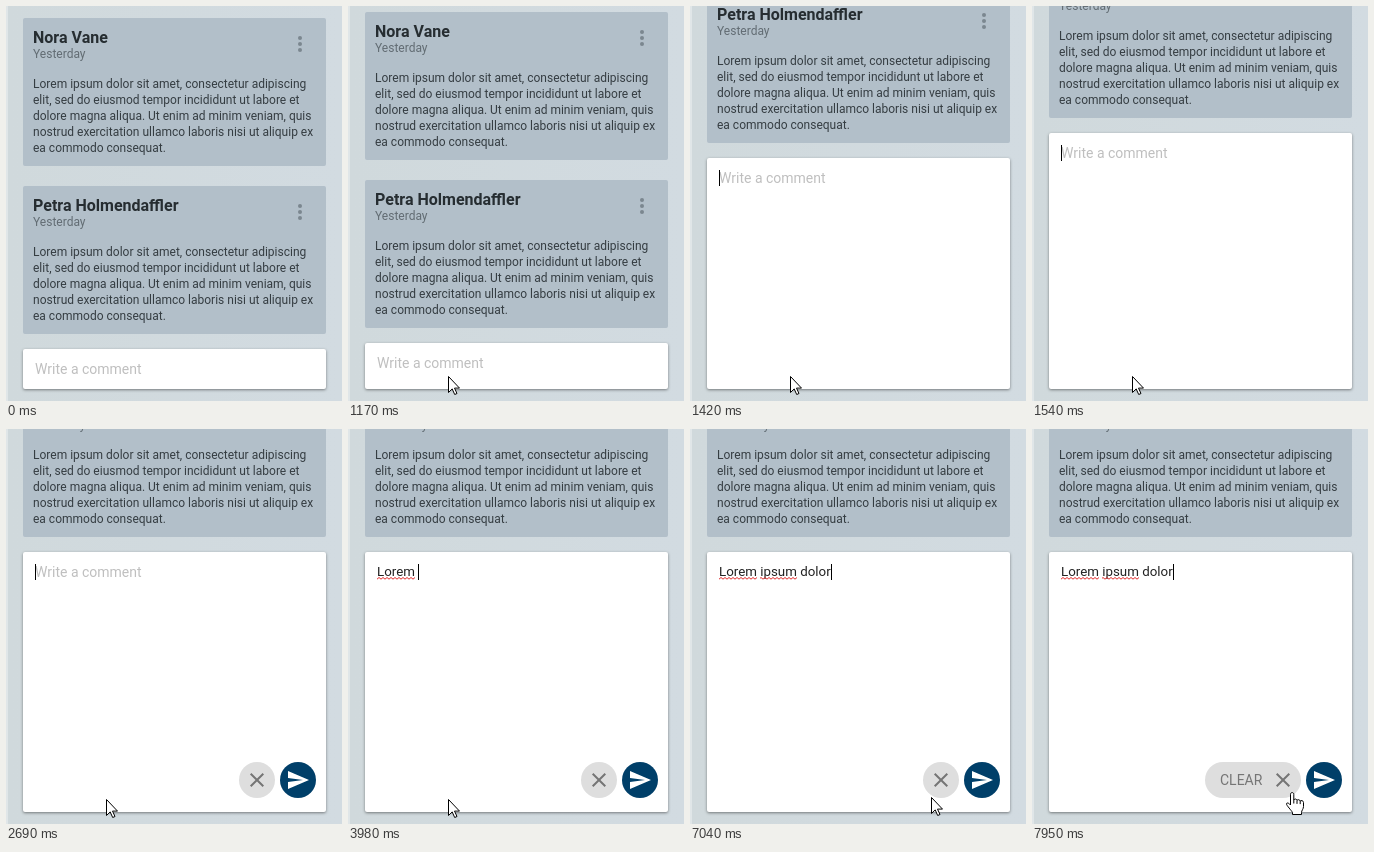
Recreate the animation shown at these times as an HTML page. Size 336 by 395 pixels, loop 8000 ms.

```html
<!DOCTYPE html>
<html lang="en">
<head>
<meta charset="utf-8">
<title>Comment box</title>
<style>
html, body { margin: 0; width: 100%; height: 100%; overflow: hidden; }
body { position: relative; background: linear-gradient(90deg, #e0e6e8 2px, #d0d9dc 2px, #d2dbe1); font: 12px/16px Roboto, sans-serif; color: #353d42; }
body * { box-sizing: border-box; }
body *, svg { position: absolute; }
svg { overflow: visible; }
svg * { position: static; }

#thread { left: 17px; top: 0; width: 303px; animation: scroll 8s infinite; }
.card { width: 303px; height: 148px; border-radius: 2px; background: #b2bfc9; }
.card h3 { left: 10px; top: 10px; margin: 0; font-size: 16px; line-height: 19px; color: #262d31; white-space: nowrap; }
.card small { left: 10px; top: 28px; font-size: 12px; color: #626c73; }
.card p { left: 10px; top: 58px; margin: 0; white-space: pre; }
.card svg { left: 275px; top: 18px; fill: #7b878f; }

#box { left: 17px; bottom: calc(100% - 383px); width: 303px; height: 40px; border-radius: 2px; background: #fff; box-shadow: 0 1px 3px rgba(0, 0, 0, .45); animation: grow 8s infinite; }
#hint, #text { left: 12px; top: 12px; white-space: pre; }
#hint { font-size: 14px; color: #bfbfbf; }
#text { height: 16px; font-size: 13.333px; color: #222; }
#text span { position: static; }
#text #caret { display: inline-block; width: 1px; height: 16px; margin-right: -1px; background: #000; vertical-align: top; }
.wave { left: 12px; top: 25px; }

.btn { top: 333px; height: 36px; border-radius: 18px; overflow: hidden; }
.btn svg { right: 6px; top: 6px; }
#pop1, #pop2 { left: 0; top: 0; animation: pop 8s infinite; }
#pop1 { transform-origin: 251px 351px; }
#pop2 { transform-origin: 292px 351px; }
#clear { right: -269px; width: 36px; background: #dedede; animation: widen 8s infinite; }
#clear div { left: 0; right: 36px; height: 36px; overflow: hidden; }
#clear b { left: 15px; font: 14px/36px Roboto, sans-serif; color: #757575; }
#send { left: 274px; width: 36px; background: #003f69; }

.mouse { left: 0; top: 0; fill: #fff; stroke: #000; stroke-linejoin: round; }
#arrow { animation: arrow 8s linear infinite; }
#hand { animation: hand 8s step-end infinite; }

@keyframes scroll { 0%, 14.39% { top: 0; } 20.23%, 100% { top: -220px; } }
@keyframes grow { 0%, 14.39% { height: 40px; } 20.23%, 100% { height: 260px; } }
@keyframes pop { 0%, 20.5% { transform: scale(0); } 24.2%, 100% { transform: none; } }
@keyframes widen { 0%, 92.5% { width: 36px; } 96.6%, 100% { width: 96px; } }
@keyframes arrow {
  0%, 8.24% { opacity: 0; transform: translate(149px, 385px); }
  8.25% { opacity: 1; transform: translate(149px, 385px); }
  9% { transform: translate(128px, 370px); }
  9.9% { transform: translate(108px, 363px); }
  10.7% { transform: translate(99px, 366px); }
  11.5%, 82% { transform: translate(100px, 370px); }
  84% { transform: translate(140px, 374px); }
  86% { transform: translate(200px, 373px); }
  88%, 88.8% { transform: translate(241px, 368px); }
  92.12% { opacity: 1; transform: translate(245px, 369px); }
  92.125%, 100% { opacity: 0; transform: translate(245px, 369px); }
}
@keyframes hand {
  0% { opacity: 0; transform: translate(243px, 367px); }
  92.125% { opacity: 1; transform: translate(243px, 367px); }
  99.375%, 100% { opacity: 1; transform: translate(254px, 363px); }
}
</style>
</head>
<body>
<div id="thread"></div>

<div id="box">
  <div id="hint">Write a comment</div>
  <div id="text"><span id="typed"></span><span id="caret"></span></div>
  <svg class="wave" width="90" height="3">
    <defs>
      <pattern id="zig" width="4" height="3" patternUnits="userSpaceOnUse">
        <path d="M-1 3L2 .5 5 3" fill="none" stroke="#e02a2a"/>
      </pattern>
    </defs>
    <rect id="wave1" width="38" height="3" fill="url(#zig)"/>
    <rect id="wave2" x="41" width="37" height="3" fill="url(#zig)"/>
  </svg>
</div>

<div id="pop1">
  <div id="clear" class="btn">
    <div><b>CLEAR</b></div>
    <svg width="24" height="24"><path d="M5.7 5.7l12.6 12.6M18.3 5.7L5.7 18.3" stroke="#757575" stroke-width="2"/></svg>
  </div>
</div>
<div id="pop2">
  <div id="send" class="btn">
    <svg width="24" height="24"><path d="M2 21L23 12 2 3v7l15 2-15 2z" fill="#fff"/></svg>
  </div>
</div>

<svg id="arrow" class="mouse" width="12" height="19">
  <path d="M.5 .5v16l3.7-3.6 2.5 5.6 2.3-1-2.5-5.4h5z"/>
</svg>
<svg id="hand" class="mouse" width="18" height="23">
  <path d="M4.5 13V2.3C4.5 0 7.8 0 7.8 2.3V8c.5-1.5 3-1.2 3.2.4.6-1.2 2.9-.9 3.2.7.7-1 3.3-.6 3.3 1.4v4c0 2.5-2 4-2 6v2h-9v-2C5.5 18.500 .5 13.500 .5 12c0-1.500 2-1.500 4 1z"/>
  <path d="M7.800 8v3.500M11 8.400v3.500M14.200 9.100v3" fill="none"/>
</svg>

<script>
const $ = id => document.getElementById(id);

const lorem = `Lorem ipsum dolor sit amet, consectetur adipiscing
elit, sed do eiusmod tempor incididunt ut labore et
dolore magna aliqua. Ut enim ad minim veniam, quis
nostrud exercitation ullamco laboris nisi ut aliquip ex
ea commodo consequat.`;

const card = (name, top) => `<div class="card" style="top:${top}px">
  <h3>${name}</h3><small>Yesterday</small><p>${lorem}</p>
  <svg width="4" height="16">${[2, 8, 14].map(y => `<circle cx="2" cy="${y}" r="2"/>`).join('')}</svg>
</div>`;
$('thread').innerHTML = card('Nora Vane', 12) + card('Petra Holmendaffler', 180);

const message = 'Lorem ipsum dolor';
const keys = [2690, 2870, 3300, 3390, 3480, 3680, 3980, 4110, 4290,
  4360, 4540, 4740, 4860, 4980, 5290, 5470, 5600];
const focusAt = 1170, firstBlink = 1240, blink = 500;

// Share the clock of the CSS animations
const clock = $('thread').getAnimations()[0];
const show = (id, on) => { $(id).style.visibility = on ? 'visible' : 'hidden'; };

function draw() {
  const t = (clock.currentTime || 0) % 8000;
  const n = keys.filter(k => k <= t).length;
  const last = n ? keys[n - 1] : firstBlink;
  $('typed').textContent = message.slice(0, n);
  show('hint', !n);
  show('caret', t >= focusAt && (t - last) % (2 * blink) < blink);
  show('wave1', n > 5);
  show('wave2', n > 11);
  requestAnimationFrame(draw);
}
draw();
</script>
</body>
</html>
```
